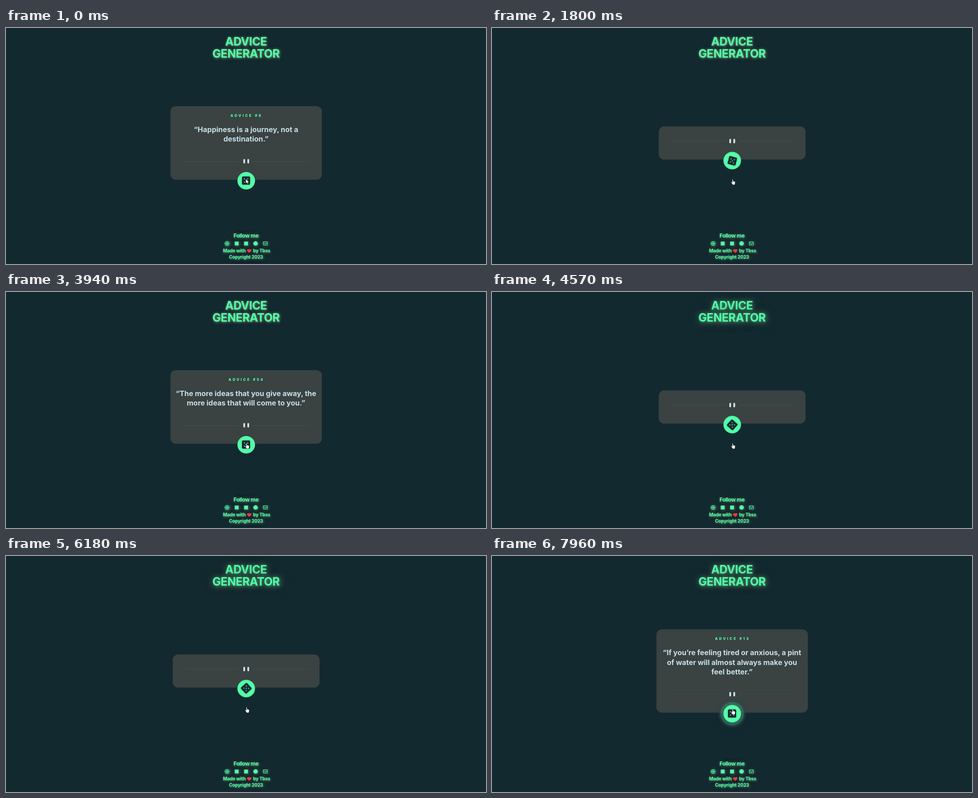
Animation of 1064 by 526 pixels, one loop 7.99 s. Source, as an HTML page:

```html
<!DOCTYPE html>
<html lang="en">
<head>
<meta charset="utf-8">
<title>Advice generator</title>
<style>
  :root { --green: #52ffa8; --pale: #c8e0e8; --t: 0; --s: 0; }
  html, body { margin: 0; width: 100%; height: 100%; overflow: hidden; background: #12292f; }
  body { position: relative; font-family: Inter, "Open Sans", sans-serif; font-weight: 700; color: var(--green); }
  #stage { position: absolute; left: 0; top: 0; width: 1064px; height: 526px; overflow: hidden; }
  #stage div, svg { position: absolute; }
  svg { left: 0; top: 0; overflow: visible; }
  .line { left: 0; width: 1064px; text-align: center; white-space: pre; }

  #title {
    top: 17px; font-size: 25px; line-height: 27px; letter-spacing: -.4px;
    animation: glow 1847ms calc((var(--t) + 1487) * -1ms) infinite paused;
  }
  @keyframes glow {
    0%, 100% {
      text-shadow: 1px 1px 3px rgba(82, 255, 168, .4), 1px 1px 7px rgba(120, 140, 110, .8), 1px 1px 7px rgba(80, 66, 66, .6);
      animation-timing-function: ease;
    }
    24%, 28% {
      text-shadow: 1px 1px 5px rgba(82, 255, 168, .35), 1px 1px 13px rgba(82, 200, 140, .75), 1px 1px 22px rgba(84, 64, 64, 1);
      animation-timing-function: cubic-bezier(.2, .6, .3, 1);
    }
  }

  #label { text-indent: 2px; font-size: 8px; line-height: 10px; font-weight: 800; letter-spacing: 3.1px; }
  #quote { font-size: 16px; line-height: 21.75px; letter-spacing: -.02px; color: var(--pale); }
  .rule { height: 1px; background: #464d4f; }
  .hover .rule { background: #3c485a; }
  .bar { width: 4px; border-radius: 2px; background: var(--pale); }

  #button { left: 513px; width: 39px; height: 39px; border-radius: 50%; background: var(--green); }
  .hover #button {
    box-shadow: 0 0 0 6.5px rgba(62, 150, 110, .45), 0 0 3px 10.5px rgba(38, 88, 98, .4), 0 4px 10px 9px rgba(60, 44, 48, .3);
  }
  .busy #button { animation: spin 877ms calc(var(--s) * -1ms) linear infinite paused; }
  @keyframes spin { to { transform: rotate(360deg); } }

  .foot { text-shadow: 1px 1px 3px rgba(82, 255, 168, .35), 1px 1px 7px rgba(120, 125, 105, .8), 1px 1px 8px rgba(80, 66, 66, .6); }
  .small { font-size: 10.2px; line-height: 13px; letter-spacing: -.2px; white-space: pre; }
  #icons { filter: drop-shadow(1px 1px 3px rgba(120, 130, 110, .8)); }
</style>
</head>
<body>
<div id="stage">
  <div id="title" class="line">ADVICE
GENERATOR</div>

  <svg width="1064" height="526"><rect id="card" rx="12" fill="#3a4242"/></svg>
  <div id="label" class="line"></div>
  <div id="quote" class="line"></div>
  <div class="rule"></div><div class="rule"></div>
  <div class="bar"></div><div class="bar"></div>

  <div id="button">
    <svg width="39" height="39">
      <rect x="9.9" y="9.8" width="18.4" height="18.4" rx="2.8" fill="#14282e"/>
      <g fill="#52ffa8">
        <circle cx="15.5" cy="15.4" r="1.2"/><circle cx="22.7" cy="15.4" r="1.2"/>
        <circle cx="19.1" cy="19" r="1.2"/>
        <circle cx="15.5" cy="22.6" r="1.2"/><circle cx="22.7" cy="22.6" r="1.2"/>
      </g>
    </svg>
  </div>

  <div class="line foot" style="top:455px;font-size:12px;line-height:15px;letter-spacing:-.4px">Follow me</div>
  <svg id="icons" width="1064" height="526" fill="#52ffa8">
    <circle cx="490" cy="480.2" r="5.3"/>
    <g fill="none" stroke="#14282e" stroke-width=".7">
      <ellipse cx="490" cy="480.2" rx="2.4" ry="5.3"/>
      <path d="M484.7 478.4h10.6M484.7 482h10.6"/>
    </g>
    <rect x="507" y="476" width="8.6" height="8.6"/>
    <rect x="527.8" y="476" width="8.6" height="8.6"/>
    <circle cx="553.2" cy="480.2" r="5"/>
    <g fill="none" stroke="#52ffa8" stroke-width="1.1" stroke-linejoin="round">
      <rect x="570.2" y="476.6" width="9.4" height="7.4" rx="1"/>
      <path d="M570.4 478.4l4.5 3.3 4.5-3.3"/>
    </g>
  </svg>
  <div class="foot small" style="left:481px;top:490px">Made with</div>
  <svg width="1064" height="526">
    <path d="M539.3 501.3c-2.6-2-4.9-3.8-4.9-6 0-2.9 3.5-3.4 4.9-1.2 1.4-2.2 4.9-1.7 4.9 1.2 0 2.2-2.3 4-4.9 6z" fill="#ee3a3f"/>
  </svg>
  <div class="foot small" style="left:547.5px;top:490px">by Tbss</div>
  <div class="line foot small" style="top:503.5px">Copyright 2023</div>

  <svg id="pointer" width="12" height="14">
    <path id="hand" fill="#fff" stroke="#1b2326" stroke-width=".6" stroke-linejoin="round"
      d="M2.4 .9c0-1.2 1.8-1.2 1.8 0v4l.3-.1c.2-.7 1.5-.6 1.6.2.4-.5 1.4-.3 1.5.4.5-.4 1.4-.1 1.4.7v2.6c0 1.6-1 2.3-1.1 3.8H3.5C3.1 10.8 1.5 9.7.3 7.6c-.6-1 .5-1.7 1.2-1l.9.9z"/>
    <path id="arrow" fill="#fff" stroke="#1b2326" stroke-width=".6" stroke-linejoin="round"
      d="M1.8-.4v9.7l2.2-2 1.5 3.2 1.6-.7-1.4-3.1h3z"/>
  </svg>
</div>

<script>
  const LOOP = 7990, MID_X = 532.3, MID_Y = 256.3;
  const $ = id => document.getElementById(id);
  const stage = $("stage");
  const rules = document.querySelectorAll(".rule"), bars = document.querySelectorAll(".bar");

  // Each round: when the advice shows, when the pointer lands, the press, the wait.
  const rounds = [
    { show: 0, over: 60, press: 1180, wait: 1327, no: 8,
      text: ["“Happiness is a journey, not a", "destination.”"] },
    { show: 3150, over: 3270, press: 3880, wait: 4030, no: 54,
      text: ["“The more ideas that you give away, the", "more ideas that will come to you.”"] },
    { show: 5110, over: 5220, press: 5910, wait: 6066, no: 69,
      text: ["“Visitors are like fish: As much as you", "might like them, after three days they", "start to smell.”"] },
    { show: 7090, over: 7200, press: LOOP, wait: LOOP, no: 13,
      text: ["“If you’re feeling tired or anxious, a pint", "of water will almost always make you", "feel better.”"] }
  ];

  function place(el, box) {
    for (const k in box) el.style[k] = box[k] + "px";
  }

  function layout(round, busy) {
    const width = busy ? 325.4 : 335.6;
    const height = busy ? 73.7 : 120.4 + 21.75 * round.text.length;
    const top = MID_Y - height / 2, bottom = MID_Y + height / 2, mid = bottom - 41.3;
    const k = busy ? .97 : 1;
    place($("card"), { x: MID_X - width / 2, y: top, width, height });
    place($("label"), { top: top + 15.8 });
    place($("quote"), { top: top + 41.3 });
    $("label").textContent = busy ? "" : "ADVICE #" + round.no;
    $("quote").textContent = busy ? "" : round.text.join("\n");
    place(rules[0], { left: MID_X - 140 * k, width: 124 * k, top: Math.round(mid) });
    place(rules[1], { left: MID_X + 16.5 * k, width: 123.5 * k, top: Math.round(mid) });
    bars.forEach((b, i) => place(b, { left: MID_X - 6.3 + 8.6 * i, top: mid - 5 * k, height: 10 * k }));
    place($("button"), { top: bottom + 2.3 - 19.5 });
  }

  let last = "";
  function draw(t) {
    const round = rounds.findLast(r => t >= r.show);
    const busy = t >= round.wait;
    const hover = t >= round.over && t < round.press;
    const key = round.no + "/" + busy;
    if (key !== last) layout(round, busy);
    last = key;
    stage.className = busy ? "busy" : hover ? "hover" : "";
    stage.style.setProperty("--t", t);
    stage.style.setProperty("--s", Math.max(0, t - round.wait));
    const arrow = t < round.over;
    $("arrow").style.display = arrow ? "" : "none";
    $("hand").style.display = arrow ? "none" : "";
    const drop = 4 * Math.min(1, Math.max(0, (t - 7750) / 180));
    place($("pointer"), { left: 529.8, top: 337.3 + drop });
  }

  function tick() {
    draw(performance.now() % LOOP);
    requestAnimationFrame(tick);
  }
  tick();
</script>
</body>
</html>
```
